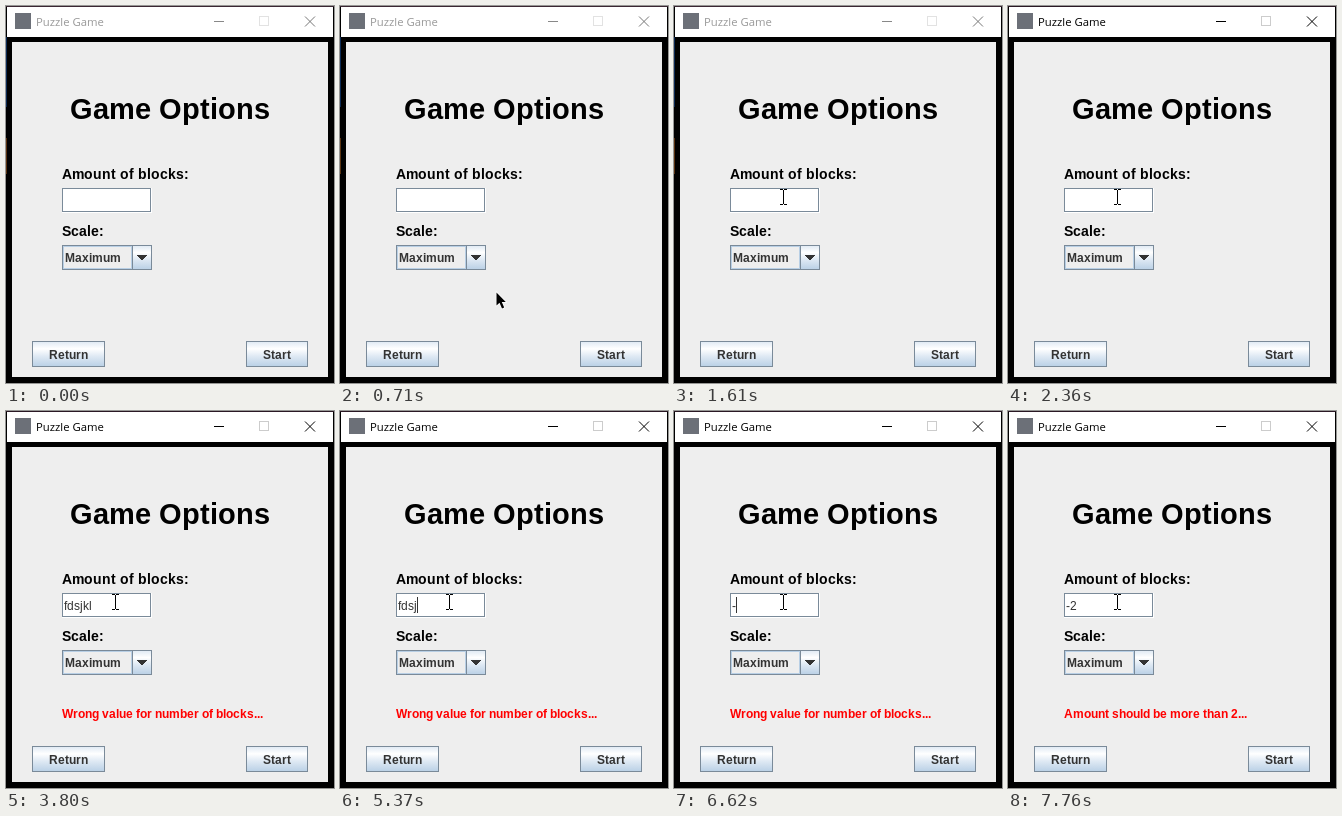
Recreate the animation shown at these times as an HTML page with a canvas. Size 328 by 377 pixels, loop 8000 ms.

```html
<!DOCTYPE html>
<html lang="en">
<head>
<meta charset="utf-8">
<title>Puzzle Game</title>
<style>
  html, body { margin: 0; width: 100%; height: 100%; overflow: hidden; background: #000; }
  canvas { display: block; }
</style>
</head>
<body>
<canvas id="stage" width="328" height="377"></canvas>
<script>
const ctx = document.getElementById('stage').getContext('2d');
const LOOP = 8000, ACTIVE = 1850;
const EDGE = '#7a8a99', PANEL = '#eeeeee', INK = '#333333';
const WRONG = 'Wrong value for number of blocks...';
const TOO_FEW = 'Amount should be more than 2...';

// [time, field text, caret visible, error]
const typing = [
  [0, '', 0, ''], [1850, '', 1, ''], [2360, '', 0, ''],
  [2870, 'f', 1, WRONG], [3020, 'fd', 1, WRONG], [3110, 'fds', 1, WRONG],
  [3190, 'fdsjk', 1, WRONG], [3280, 'fdsjkl', 1, WRONG],
  [3800, 'fdsjkl', 0, WRONG], [4300, 'fdsjkl', 1, WRONG], [4780, 'fdsjkl', 0, WRONG],
  [5140, 'fdsjk', 1, WRONG], [5370, 'fdsj', 1, WRONG], [5520, 'fds', 1, WRONG],
  [5650, 'fd', 1, WRONG], [5830, 'f', 1, WRONG], [6010, '', 1, ''],
  [6490, '', 0, ''], [6620, '-', 1, WRONG], [7100, '-', 0, WRONG],
  [7250, '-2', 1, TOO_FEW], [7760, '-2', 0, TOO_FEW]
];

// [time, x, y]
const arrowPath = [
  [490, 184, 366], [700, 150, 268], [900, 119, 192],
  [1060, 107, 164], [1230, 105, 180], [1290, 104, 179]
];
const beamPath = [[1340, 107, 182], [1610, 109, 191]];

function rect(x, y, w, h, fill) {
  ctx.fillStyle = fill;
  ctx.fillRect(x, y, w, h);
}

function frame(x, y, w, h, color) {
  ctx.strokeStyle = color;
  ctx.lineWidth = 1;
  ctx.strokeRect(x + .5, y + .5, w - 1, h - 1);
}

function line(x1, y1, x2, y2) {
  ctx.beginPath();
  ctx.moveTo(x1, y1);
  ctx.lineTo(x2, y2);
  ctx.stroke();
}

// Whole-pixel advances, as in the Swing toolkit; returns the end x.
function text(str, x, y, size, color = '#000', weight = 'bold') {
  ctx.font = `${weight} ${size}px "Liberation Sans", Arial, sans-serif`;
  ctx.fillStyle = color;
  for (const ch of str) {
    ctx.fillText(ch, x, y);
    x += Math.round(ctx.measureText(ch).width);
  }
  return x;
}

function glossy(x, y, w, h) {
  const g = ctx.createLinearGradient(0, y, 0, y + h);
  g.addColorStop(0, '#dde8f3');
  g.addColorStop(.3, '#ffffff');
  g.addColorStop(.6, '#dde8f3');
  g.addColorStop(1, '#b8cfe5');
  rect(x, y, w, h, g);
  frame(x, y, w, h, EDGE);
}

function pointAt(path, t) {
  let i = 1;
  while (i < path.length - 1 && t > path[i][0]) i++;
  const [t0, x0, y0] = path[i - 1], [t1, x1, y1] = path[i];
  const k = Math.min(1, Math.max(0, (t - t0) / (t1 - t0)));
  return [Math.round(x0 + (x1 - x0) * k), Math.round(y0 + (y1 - y0) * k)];
}

function stepped(t, start, end, count) {
  const step = (end - start) / (count - 1);
  return start + Math.min(count - 1, Math.floor((t - start) / step)) * step;
}

function drawWindow(active) {
  rect(0, 0, 328, 377, '#000');
  rect(0, 0, 328, 1, active ? '#2a1824' : '#3a2733');
  if (!active) {
    rect(0, 31, 1, 70, '#0b2a55');
    rect(0, 132, 1, 36, '#5a3210');
  }
  rect(1, 1, 326, 30, '#fff');
  rect(9, 7, 16, 16, '#6c7078');
  ctx.font = '11.3px "Open Sans", "Noto Sans", sans-serif';
  ctx.fillStyle = active ? '#000' : '#999';
  ctx.fillText('Puzzle Game', 30, 20);

  rect(208, 15, 10, 1, active ? '#000' : '#888');
  frame(253, 10, 10, 10, active ? '#ccc' : '#e2e2e2');
  ctx.strokeStyle = active ? '#000' : '#777';
  line(299, 10.5, 309, 20.5);
  line(309, 10.5, 299, 20.5);
  rect(6, 36, 316, 335, PANEL);
}

function drawForm() {
  text('Game Options', 64, 113, 29);
  text('Amount of blocks:', 56, 173, 14);
  text('Scale:', 56, 230, 14);

  rect(56, 182, 90, 25, '#fff');
  frame(56, 182, 89, 24, EDGE);

  glossy(56, 239, 90, 25);
  rect(57, 240, 69, 23, PANEL);
  frame(57, 240, 69, 23, '#b8cfe5');
  rect(126, 239, 1, 25, EDGE);
  text('Maximum', 59, 256, 12, INK);
  for (let i = 0; i < 5; i++) rect(131 + i, 249 + i, 10 - 2 * i, 1, INK);

  glossy(26, 335, 73, 26);
  text('Return', 43, 353, 12, INK);
  glossy(240, 335, 62, 26);
  text('Start', 257, 353, 12, INK);
}

function drawArrow(x, y) {
  ctx.save();
  ctx.translate(x, y);
  const tip = new Path2D('M.5 .5V13.5L3.5 10.8L6 16.5L8.2 15.6L5.8 10H9.8Z');
  ctx.strokeStyle = '#fff';
  ctx.lineWidth = 1.4;
  ctx.stroke(tip);
  ctx.fillStyle = '#000';
  ctx.fill(tip);
  ctx.restore();
}

function drawBeam(x, y) {
  for (const cap of [-8, 7]) {
    rect(x - 3, y + cap, 3, 1, '#000');
    rect(x + 1, y + cap, 3, 1, '#000');
  }
  rect(x, y - 7, 1, 14, '#000');
}

function drawPointer(t) {
  if (t < 490) return;
  if (t < 1340) return drawArrow(...pointAt(arrowPath, stepped(t, 490, 1290, 15)));
  const [x, y] = pointAt(beamPath, stepped(t, 1340, 1610, 6));
  if (t >= ACTIVE && t < 2050) {
    ctx.fillStyle = 'rgba(255, 255, 0, .47)';
    ctx.beginPath();
    ctx.arc(x, y, 12, 0, 2 * Math.PI);
    ctx.fill();
  }
  drawBeam(x, y);
}

function draw(t) {
  drawWindow(t >= ACTIVE);
  drawForm();
  const [, value, caret, error] = typing.findLast(s => s[0] <= t);
  const end = text(value, 58, 199, 12, INK, 'normal');
  if (caret) rect(end, 186, 1, 16, INK);
  text(error, 56, 307, 12, '#f00');
  drawPointer(t);
}

const start = performance.now();
function tick() {
  draw((performance.now() - start) % LOOP);
  requestAnimationFrame(tick);
}
tick();
</script>
</body>
</html>
```
